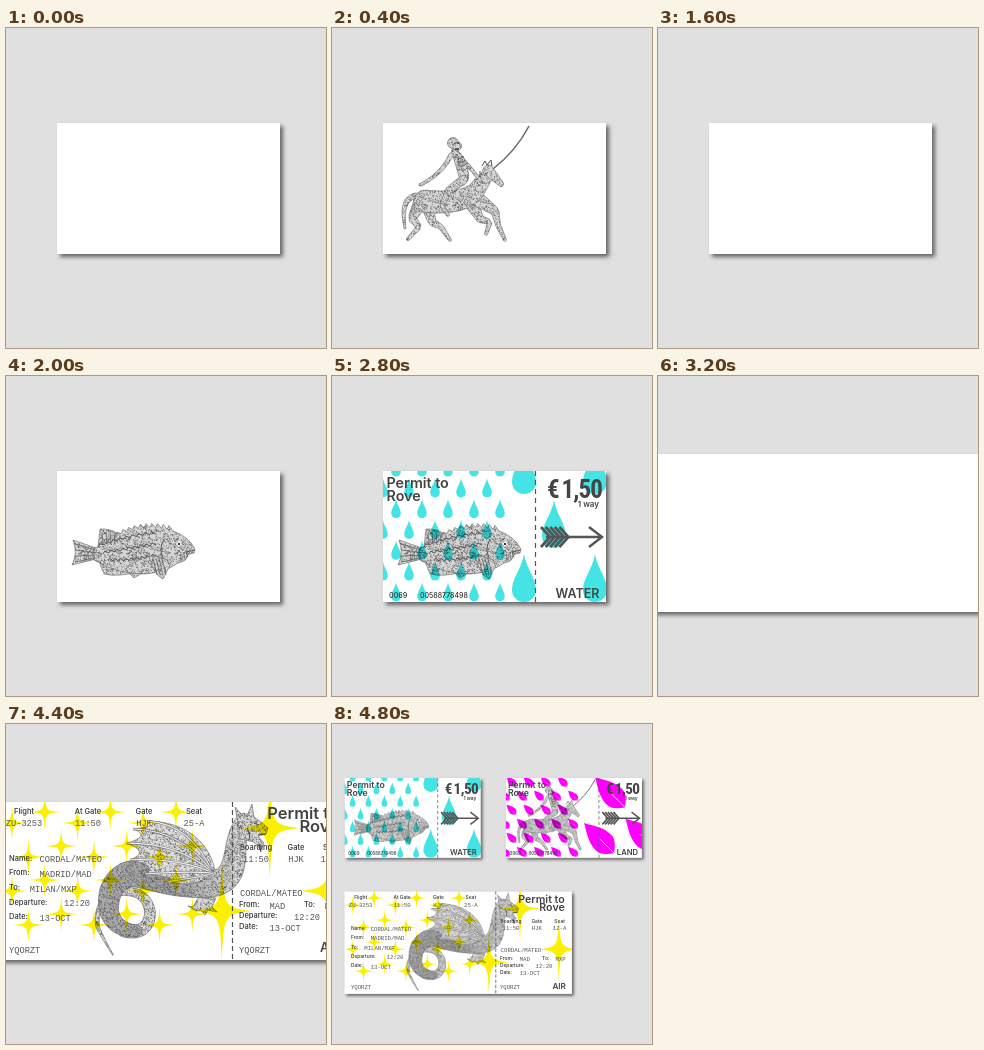
An HTML page for the animation above (5800 ms loop, 320 by 320 pixels).

```html
<!DOCTYPE html>
<html lang="en">
<head>
<meta charset="utf-8">
<title>Travel tickets</title>
<style>
html, body { margin: 0; width: 100%; height: 100%; overflow: hidden; background: #e0e0e0; }
svg { display: block; width: 100vw; height: 100vh; }
text { font-family: Inter, Roboto, sans-serif; font-weight: 500; fill: #333; }
.title { font-weight: 600; fill: #444; }
.price {
  font-family: "Roboto Condensed", Roboto, "Open Sans", sans-serif; font-stretch: 75%;
  font-weight: 600; fill: #444; letter-spacing: -.9px; word-spacing: -2px;
}
.mono { font-family: "Liberation Mono", monospace; font-weight: 400; fill: #555; }
.tint { mix-blend-mode: multiply; }
</style>
</head>
<body>
<svg id="stage" viewBox="0 0 320 320" xmlns="http://www.w3.org/2000/svg">
  <defs>
    <filter id="soft" x="-10%" y="-10%" width="120%" height="120%"><feGaussianBlur stdDeviation="2.2"/></filter>
    <pattern id="hatch" width="48" height="48" patternUnits="userSpaceOnUse">
      <path id="grain" stroke="#444" stroke-width=".6"/>
    </pattern>
    <linearGradient id="hide" gradientUnits="userSpaceOnUse" x1="100" y1="0" x2="250" y2="0">
      <stop offset="0" stop-color="#aaa"/><stop offset=".4" stop-color="#9c9c9c"/>
      <stop offset="1" stop-color="#e4e4e4"/>
    </linearGradient>
    <clipPath id="smallClip"><rect x="51" y="95" width="223" height="131"/></clipPath>
    <clipPath id="wideClip"><rect x="-7" y="78" width="351" height="158"/></clipPath>
  </defs>
</svg>
<script>
const NS = 'http://www.w3.org/2000/svg';
const stage = document.getElementById('stage');

function add(parent, tag, attrs = {}, content) {
  const el = document.createElementNS(NS, tag);
  for (const k in attrs) el.setAttribute(k, attrs[k]);
  if (content !== undefined) el.textContent = content;
  parent.appendChild(el);
  return el;
}

let seed = 7;
function rnd() {
  seed = (seed * 16807) % 2147483647;
  return seed / 2147483647;
}

let grain = '';
for (let i = 0; i < 850; i++) {
  grain += `M${(rnd() * 48).toFixed(1)} ${(rnd() * 48).toFixed(1)}l1 ${(rnd() - .3).toFixed(1)}`;
}
document.getElementById('grain').setAttribute('d', grain);

// Engraved shape: tone, grain, outline
function ink(g, d, tone = '#d6d6d6') {
  add(g, 'path', { d, fill: tone });
  add(g, 'path', { d, fill: 'url(#hatch)', stroke: '#666', 'stroke-width': .6, 'stroke-linejoin': 'round' });
}
function line(g, d, w = .7, color = '#555') {
  return add(g, 'path', { d, fill: 'none', stroke: color, 'stroke-width': w });
}

// Tapering limb along a centre line
function limb(g, spine, r0, r1, bulge = 0, tone) {
  const path = document.createElementNS(NS, 'path');
  path.setAttribute('d', spine);
  const len = path.getTotalLength(), n = Math.ceil(len / 2.5);
  const left = [], right = [];
  for (let i = 0; i <= n; i++) {
    const u = i / n, r = r0 + (r1 - r0) * u + bulge * Math.sin(Math.PI * u);
    const p = path.getPointAtLength(u * len);
    const a = path.getPointAtLength(Math.max(0, u * len - 1));
    const b = path.getPointAtLength(Math.min(len, u * len + 1));
    const t = Math.atan2(b.y - a.y, b.x - a.x), dx = r * Math.sin(t), dy = r * Math.cos(t);
    left.push(`${(p.x + dx).toFixed(1)} ${(p.y - dy).toFixed(1)}`);
    right.unshift(`${(p.x - dx).toFixed(1)} ${(p.y + dy).toFixed(1)}`);
  }
  ink(g, `M${left.join('L')}A${r1} ${r1} 0 0 1 ${right.join('L')}A${r0} ${r0} 0 0 1 ${left[0]}Z`, tone);
}

// Saw-toothed ridge along a bowed line
function ridge(x0, y0, x1, y1, n, h, bow) {
  let d = '';
  for (let i = 0; i <= n; i++) {
    const u = i / n, x = x0 + (x1 - x0) * u, y = y0 + (y1 - y0) * u - bow * 4 * u * (1 - u);
    d += `${i ? 'L' : 'M'}${x.toFixed(1)} ${y.toFixed(1)}`;
    if (i < n) d += `l${((x1 - x0) / n * .3).toFixed(1)} ${-h}`;
  }
  return d;
}

function drawRider(g) {
  limb(g, 'M84 168Q68 170 73 200', 3, 1);
  ['M95 176L100 194L109 199L118 212', 'M88 176L80 190L87 199L76 211',
   'M140 176L148 191L158 194L154 206', 'M148 173L163 183L166 197L173 212'].forEach(d => limb(g, d, 7, 1.6, -1));
  limb(g, 'M92 173Q128 177 143 164L157 145', 11, 5.5, 2);
  limb(g, 'M156 142L169 156', 5.5, 2.6);
  line(g, 'M150 138l3 -5l2 4l4 -5l1 6M142 152q7 0 6 -9', 1);
  line(g, 'M161 141Q184 123 197 98', 1.5, '#666');
  limb(g, 'M129 130L140 142L148 152', 2, 1.4);
  limb(g, 'M122 123Q130 134 132 150', 3, 4.5, 1.5);
  limb(g, 'M131 152L117 162L110 178L116 187', 4.5, 1.6);
  limb(g, 'M119 127Q110 146 88 157', 2.2, 1.4);
  limb(g, 'M121 115L125 118', 5.5, 4.5);
  for (let i = 0; i < 4; i++) line(g, `M${124 + i} ${129 + i * 4}q5 3 8 -1`, .8);
  line(g, 'M125 115h2M123 121h4', 1.4, '#333');
}

function drawFish(g) {
  ink(g, 'M90 172L67 164Q72 177 66 189L90 183Z');
  ink(g, 'M92 171L94 153Q105 152 116 160L112 168Z');
  ink(g, 'M92 183L98 198Q106 200 114 199L138 196L128 202L118 192Z');
  ink(g, 'M88 172' + ridge(92, 171, 167, 155, 13, 4, 10).replace('M', 'L')
    + 'Q182 160 189 173L188 177L181 179Q182 185 172 187Q158 197 138 198Q110 198 88 184Z');
  for (let i = 0; i < 3; i++) line(g, ridge(92 + i * 5, 171 + i * 7, 150, 158 + i * 11, 9, 3, 2 - i * 2), 1);
  line(g, 'M158 163Q151 175 160 187M189 174L180 176L182 181', 1);
  ink(g, 'M143 180Q158 180 165 187L157 203Q148 199 143 180Z');
  for (let i = 0; i < 4; i++) {
    line(g, `M89 ${174 + i * 2.6}L69 ${168 + i * 6}`);
    line(g, `M${147 + i * 3} 182l4 17`);
    line(g, `M${97 + i * 4} 168l-1 -12`);
  }
  add(g, 'circle', { cx: 173, cy: 168, r: 1.7, fill: '#333', stroke: '#fff' });
}

function drawDragon(g) {
  limb(g, 'M118 206C150 216 152 172 126 168S88 184 92 204Q98 216 107 231', 7, .4);
  ink(g, 'M193 172L187 183L182 182L190 187L195 186L199 191L202 186L211 188L206 183L210 174Z');
  limb(g, 'M238 97C222 120 240 160 200 160S140 148 122 150Q100 160 103 187Q108 206 130 207', 8, 6, 7, 'url(#hide)');

  // Wing fingers fan out from the shoulder
  const tips = [0, 1, 2, 3, 4, 5].map(i => {
    const a = (40 - 10 * i) * Math.PI / 180, len = 82 + 12 * i - 4 * i * i;
    return [205 - len * Math.cos(a), 150 - len * Math.sin(a)];
  });
  let wing = 'M209 147C205 122 182 97 ' + tips[0].join(' ');
  for (let i = 1; i < tips.length; i++) {
    const [px, py] = tips[i - 1], [x, y] = tips[i];
    wing += `Q${(px + x) / 2 + 22} ${(py + y) / 2} ${x} ${y}`;
  }
  ink(g, wing + 'Q190 166 209 147Z', '#dedede');
  tips.forEach(([x, y]) => {
    const rib = `M207 149Q${(x + 207) / 2 + 10} ${y + (149 - y) * .1 - 3} ${x} ${y}`;
    line(g, rib, 2.4, '#777');
    line(g, rib, 1.2, '#eee');
  });

  ink(g, 'M232 99L229 83L237 92L241 92L246 80L248 93Q256 98 262 104L260 110L252 112L258 119L255 126L248 118L234 115Z');
  line(g, 'M248 99l5 2M252 111l8 -1M241 104q4 6 2 12M253 120l2 8', 1.2);
}

// Staggered grid of motifs
function brick(x0, y0, dx, dy, shift, cols, rows, put) {
  for (let r = 0; r < rows; r++)
    for (let c = 0; c < cols; c++) put(x0 + c * dx + (r % 2) * shift, y0 + r * dy, c);
}

function leaf(g, x, y, s) {
  const t = add(g, 'g', { transform: `translate(${x} ${y}) rotate(-45) scale(${s})` });
  add(t, 'path', { d: 'M0 0C6 12 18 26 18 45C18 57 8 63 0 70C-8 63 -18 57 -18 45C-18 26 -6 12 0 0Z', fill: '#f0f' });
  add(t, 'path', { d: 'M0 36V70', stroke: '#fff', 'stroke-width': 1.3 });
}
function drop(g, x, y, s) {
  add(g, 'path', {
    transform: `translate(${x} ${y}) scale(${s})`, fill: '#44e4e4',
    d: 'M0 -24C2 -10 12 0 12 12A12 12 0 0 1 -12 12C-12 0 -2 -10 0 -24Z'
  });
}
function star(g, x, y, w, h) {
  const a = w * .07, b = h * .07;
  const arm = (sx, sy, end) => `C${sx * a} ${sy * b} ${sx * a} ${sy * b} ${end}`;
  add(g, 'path', {
    transform: `translate(${x} ${y})`, fill: '#fbf000',
    d: `M0 ${-h}${arm(1, -1, w + ' 0')}${arm(1, 1, '0 ' + h)}${arm(-1, 1, -w + ' 0')}${arm(-1, -1, '0 ' + -h)}Z`
  });
}

function leaves(g) {
  brick(52, 93, 28, 23, -11, 5, 6, (x, y) => x < 160 && leaf(g, x, y, .32));
  [[197, 94], [179, 169], [247, 162]].forEach(([x, y]) => leaf(g, x, y, 1));
}
function drops(g) {
  brick(64, 91, 26, 20.8, -13, 5, 7, (x, y) => drop(g, x, y, .4));
  brick(192, 94, 71, 54, 30, 2, 3, (x, y) => drop(g, x, y, 1));
}
function stars(g) {
  brick(6, 88, 32.8, 34, 16.4, 6, 4, (x, y, c) => star(g, x, y + (c % 2 ? 0 : 11), 16, 18));
  [[216, 187], [264, 104], [324, 167]].forEach(([x, y]) => star(g, x, y, 30, 50));
}

function write(g, x, y, size, str, cls = '', anchor = 'start') {
  add(g, 'text', { x, y, 'font-size': size, class: cls, 'text-anchor': anchor }, str);
}
function perforation(g, x, y0, y1, dash) {
  line(g, `M${x} ${y0}V${y1}`, 1.2).setAttribute('stroke-dasharray', dash);
}

const TITLE = ['Permit to', 'Rove'];

function smallText(g, name) {
  perforation(g, 203.5, 95, 226, '5 4');
  TITLE.forEach((s, i) => write(g, 54.5, 112 + i * 13, 14.3, s, 'title'));
  write(g, 270, 122, 25, '€ 1,50', 'price', 'end');
  write(g, 267, 131, 8, '1 way', 'title', 'end');
  write(g, 267.5, 221.5, 12.5, name, 'title', 'end');
  write(g, 57, 221.5, 7.2, '0069');
  write(g, 88, 221.5, 7, '00588778498');
  line(g, 'M214 161H270M257 151L270 161L257 171', 2.4);
  for (let x = 209; x < 228; x += 4.6) line(g, `M${x} 151l9 10l-9 10`, 2.8);
}

function wideText(g) {
  const head = (x, y, name, value) => {
    write(g, x, y, 7.5, name, '', 'middle');
    write(g, x, y + 12, 8.7, value, 'mono', 'middle');
  };
  const field = (x, y, name, value) => {
    write(g, x, y, 7.5, name);
    write(g, x + 6 + 4.9 * name.length, y + 1.7, 8.7, value, 'mono');
  };
  perforation(g, 226.5, 78, 236, '5 3');
  TITLE.forEach((s, i) => write(g, 333, 95 + i * 13, 16.5, s, 'title', 'end'));

  head(18, 90, 'Flight', 'ZU-3253');
  head(82, 90, 'At Gate', '11:50');
  head(138, 90, 'Gate', 'HJK');
  head(188, 90, 'Seat', '25-A');
  head(250, 126, 'Boarding', '11:50');
  head(290, 126, 'Gate', 'HJK');
  head(325, 126, 'Seat', '12-A');

  const trip = [['Departure:', '12:20'], ['Date:', '13-OCT']];
  [['Name:', 'CORDAL/MATEO'], ['From:', 'MADRID/MAD'], ['To:', 'MILAN/MXP'], ...trip]
    .forEach(([name, value], i) => field(3, 136.7 + i * 14.6, name, value));
  [['From:', 'MAD'], ...trip].forEach(([name, value], i) => field(233, 183 + i * 11, name, value));
  field(298, 183, 'To:', 'MXP');

  write(g, 234, 172, 8.7, 'CORDAL/MATEO', 'mono');
  [3, 233].forEach(x => write(g, x, 229, 8.7, 'YQORZT', 'mono'));
  write(g, 314, 228, 12.5, 'AIR', 'title');
}

function makeCard([x, y, width, height], clip, animal, motif, text, small) {
  const g = add(stage, 'g');
  add(g, 'rect', { x: x + 3, y: y + 3, width, height, fill: '#444', opacity: .8, filter: 'url(#soft)' });
  add(g, 'rect', { x, y, width, height, fill: '#fff' });
  const layers = [
    add(g, 'g'),
    add(g, 'g', { class: 'tint', 'clip-path': `url(#${clip})` }),
    add(g, 'g')
  ];
  [animal, motif, text].forEach((draw, i) => draw(layers[i]));
  return { g, layers, small };
}

const SMALL = [51, 95, 223, 131], WIDE = [-7, 78, 351, 158];
const cards = [
  makeCard(SMALL, 'smallClip', drawRider, leaves, g => smallText(g, 'LAND'), 'translate(142.8 -4) scale(.61)'),
  makeCard(SMALL, 'smallClip', drawFish, drops, g => smallText(g, 'WATER'), 'translate(-18.4 -4) scale(.61)'),
  makeCard(WIDE, 'wideClip', drawDragon, stars, wideText, 'translate(17 117) scale(.648)')
];

const LOOP = 5800, STEP = 400;
const show = (el, on) => el.setAttribute('display', on ? 'inline' : 'none');

// Each card builds up in four steps, then all three are shown together
function render(t) {
  const step = Math.min(12, Math.floor((t % LOOP) / STEP));
  const all = step === 12;
  cards.forEach((card, i) => {
    show(card.g, all || i === Math.floor(step / 4));
    card.g.setAttribute('transform', all ? card.small : 'translate(0 0)');
    card.layers.forEach((layer, k) => show(layer, all || step % 4 > k));
  });
}

const start = performance.now();
function tick() {
  render(performance.now() - start);
  requestAnimationFrame(tick);
}
tick();
</script>
</body>
</html>
```
